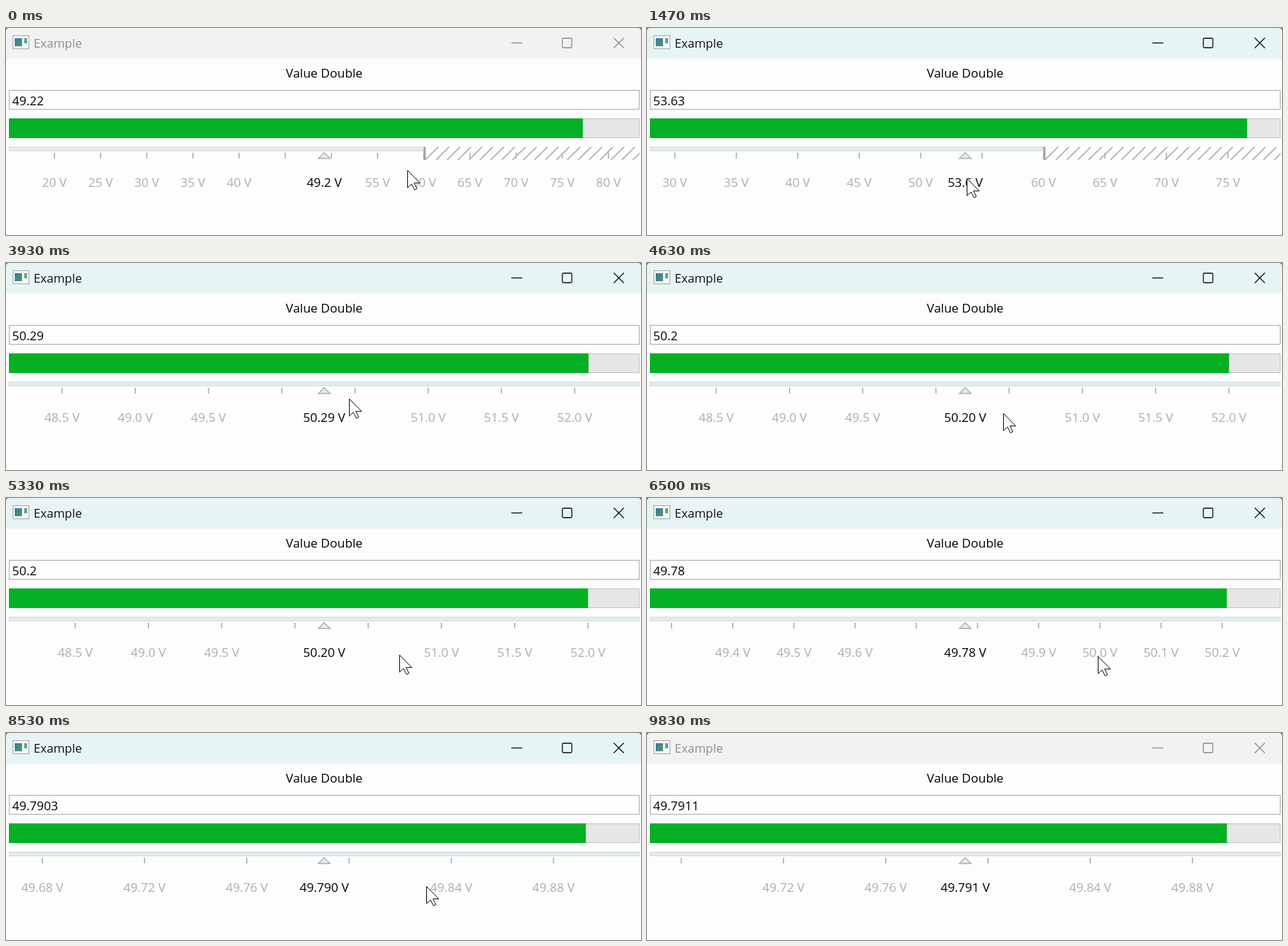
Write an HTML page that moves like this. It is 872 px wide and 284 px high and loops after 9.86 s.

```html
<!DOCTYPE html>
<html lang="en">
<head>
<meta charset="utf-8">
<title>Example</title>
<style>
  html, body { margin: 0; width: 100%; height: 100%; overflow: hidden; background: #6b6b6b; }
  svg { display: block; font: 17px "Open Sans", "Noto Sans", sans-serif; }
  .mid { text-anchor: middle; }
  .tick { stroke: #a0a0a0; stroke-width: 1.3; }
  .label { fill: #adadad; }
  #bar { fill: #f2f2f2; }
  #name { font-size: 16.6px; fill: #8e8e8e; }
  #buttons { fill: none; stroke: #8c8c94; stroke-width: 1.3; }
  #band, #pointer { fill: #ebebeb; }
  .active #bar { fill: #e7f4f4; }
  .active #name { fill: #111; }
  .active #buttons { stroke: #111; }
  .active #band, .active #pointer { fill: #e0eeee; }
</style>
</head>
<body>
<svg id="stage" width="872" height="284" viewBox="0 0 872 284">
  <defs>
    <linearGradient id="tint" x1="0" y1="0" x2="1" y2="1">
      <stop offset="0" stop-color="#3f74a8"/>
      <stop offset="1" stop-color="#4c9a68"/>
    </linearGradient>
    <clipPath id="scaleClip"><rect x="4" y="163" width="866" height="18"/></clipPath>
  </defs>

  <path fill="#fdfdfd" d="M0 284V5Q0 0 5 0H867Q872 0 872 5V284Z"/>
  <path id="bar" d="M0 42V5Q0 0 5 0H867Q872 0 872 5V42Z"/>
  <g>
    <rect x="9.5" y="10.5" width="22" height="18" fill="#fafafa" stroke="#a4a8ac"/>
    <rect x="12" y="14" width="10" height="11" fill="url(#tint)"/>
    <rect x="25" y="14" width="4" height="7" fill="#5fa58c"/>
  </g>
  <text id="name" x="38" y="27">Example</text>
  <g id="buttons">
    <path d="M694 20.5H709"/>
    <rect x="764" y="14" width="13" height="13" rx="1.5"/>
    <path d="M834.5 13.5L848.5 27.5M848.5 13.5L834.5 27.5"/>
  </g>

  <text class="mid" x="437" y="68">Value Double</text>
  <rect x="4.5" y="85.5" width="865" height="26" fill="#fefefe" stroke="#adadb2"/>
  <text id="field" x="8.5" y="106"></text>

  <rect x="4.5" y="124.5" width="865" height="26" fill="#e6e6e6" stroke="#c4c4c8"/>
  <rect id="fill" x="4" y="124" height="27" fill="#06b025"/>

  <rect id="band" x="4.5" y="163.5" height="5" stroke="#d4d8d8"/>
  <g id="ticks"></g>
  <g clip-path="url(#scaleClip)">
    <g id="limit">
      <path id="hatch" stroke="#b6b6b6" stroke-width="1.8"/>
      <path d="M1.2 163V181" stroke="#a4a4a4" stroke-width="3"/>
    </g>
  </g>
  <path id="pointer" d="M437 171L445 179H429Z" stroke="#adadb2" stroke-width="1.4"/>
  <text id="current" class="mid" x="437" y="218"></text>
  <path id="cursor" d="M.5.5V24L6 19L10 27L13.3 25.4L9.4 17.6H17.3Z"
        fill="#fff" stroke="#111" stroke-linejoin="round"/>
</svg>

<script>
const LOOP = 9860, MID = 437, LEFT = 4, RIGHT = 870, LIMIT = 60, GAP = 15;
const STEPS = [.04, .1, .2, .5, 1, 2, 5];
const START = { t: 0, x: 551, y: 195, value: 49.22, notches: 0 };

// Each gesture ends at t. A value means dragging the scale there, notches mean turning the wheel.
const GESTURES = [
  { t: 450, x: 513, y: 195, notches: 3 },
  { t: 1470, y: 206, value: 53.63 },
  { t: 2200, y: 216, value: 50.08 },
  { t: 2370, x: 531, y: 212 },
  { t: 3450, x: 513, y: 198, notches: 29 },
  { t: 3930, y: 186, value: 50.29 },
  { t: 4600, y: 206, value: 50.2 },
  { t: 5330, x: 540, y: 215 },
  { t: 5950, y: 221, value: 49.78 },
  { t: 7050, x: 613.5, y: 213, notches: 59 },
  { t: 7530, y: 198, value: 49.7864 },
  { t: 8900, y: 212, value: 49.7911 },
  { t: 9700, x: 690, y: -32 }
];

const $ = id => document.getElementById(id);
const scaleAt = notches => 12.68 * 1.1 ** notches;
const mix = (a, b, p) => a + (b - a) * p;
const digitsOf = step => step < .1 ? 2 : step < 1 ? 1 : 0;

// Ease in and out with a short rest at both ends
function ease(p) {
  p = Math.min(1, Math.max(0, p * 1.06 - .03));
  return p * p * (3 - 2 * p);
}

function poseAt(t) {
  let from = START;
  for (const g of GESTURES) {
    const to = { ...from, ...g };
    // The cursor holds on to the scale while dragging
    if (g.value) to.x = from.x + (from.value - g.value) * scaleAt(from.notches);
    if (t < g.t) {
      const raw = (t - from.t) / (g.t - from.t), p = ease(raw);
      return {
        x: mix(from.x, to.x, p),
        y: mix(from.y, to.y, p),
        value: mix(from.value, to.value, p),
        notches: Math.round(mix(from.notches, to.notches, raw))
      };
    }
    from = to;
  }
  return from;
}

const pen = document.createElement("canvas").getContext("2d");
pen.font = '17px "Open Sans", "Noto Sans", sans-serif';
const widthOf = s => pen.measureText(s).width;

function add(parent, tag, attrs) {
  const el = document.createElementNS("http://www.w3.org/2000/svg", tag);
  for (const k in attrs) el.setAttribute(k, attrs[k]);
  return parent.appendChild(el);
}

const ticks = Array.from({ length: 24 }, () => {
  const g = add($("ticks"), "g", {});
  add(g, "path", { class: "tick", d: "M0 171V179" });
  return { g, label: add(g, "text", { class: "label mid", y: 218 }) };
});

let hatch = "";
for (let x = 2; x < 900; x += 15) hatch += `M${x} 181l18 -18`;
$("hatch").setAttribute("d", hatch);

function drawScale(value, scale) {
  const roomy = s => s * scale >= widthOf(value.toFixed(digitsOf(s)) + " V") + 26;
  const step = STEPS.find(roomy) || 5;
  const digits = digitsOf(step);
  const current = value.toFixed(digits + 1) + " V";
  $("current").textContent = current;
  const half = widthOf(current) / 2;
  const first = Math.ceil((value - (MID - LEFT) / scale) / step);

  ticks.forEach(({ g, label }, i) => {
    const v = (first + i) * step;
    const x = MID + (v - value) * scale;
    g.style.display = x < RIGHT ? "" : "none";
    g.setAttribute("transform", `translate(${x.toFixed(2)})`);
    const text = v.toFixed(digits) + " V", w = widthOf(text) / 2;
    const fits = x - w > LEFT + GAP && x + w < RIGHT - GAP && Math.abs(x - MID) > half + w + GAP;
    label.textContent = fits ? text : "";
  });

  const edge = Math.min(RIGHT, MID + (LIMIT - value) * scale);
  $("band").setAttribute("width", edge - LEFT - (edge < RIGHT ? 0 : 1));
  $("limit").style.display = edge < RIGHT ? "" : "none";
  $("limit").setAttribute("transform", `translate(${edge.toFixed(2)})`);
}

function draw(t) {
  const { x, y, value: exact, notches } = poseAt(t);
  const scale = scaleAt(notches);
  const value = +exact.toFixed(Math.max(2, Math.round(Math.log10(scale))));

  $("stage").classList.toggle("active", t >= 450 && t < 9700);
  $("field").textContent = value;
  $("fill").setAttribute("width", (RIGHT - LEFT) * (value + LIMIT) / (2 * LIMIT));
  drawScale(value, scale);
  $("cursor").setAttribute("transform", `translate(${Math.round(x)} ${Math.round(y)})`);
}

const start = performance.now();
function frame() {
  draw((performance.now() - start) % LOOP);
  requestAnimationFrame(frame);
}
frame();
</script>
</body>
</html>
```
